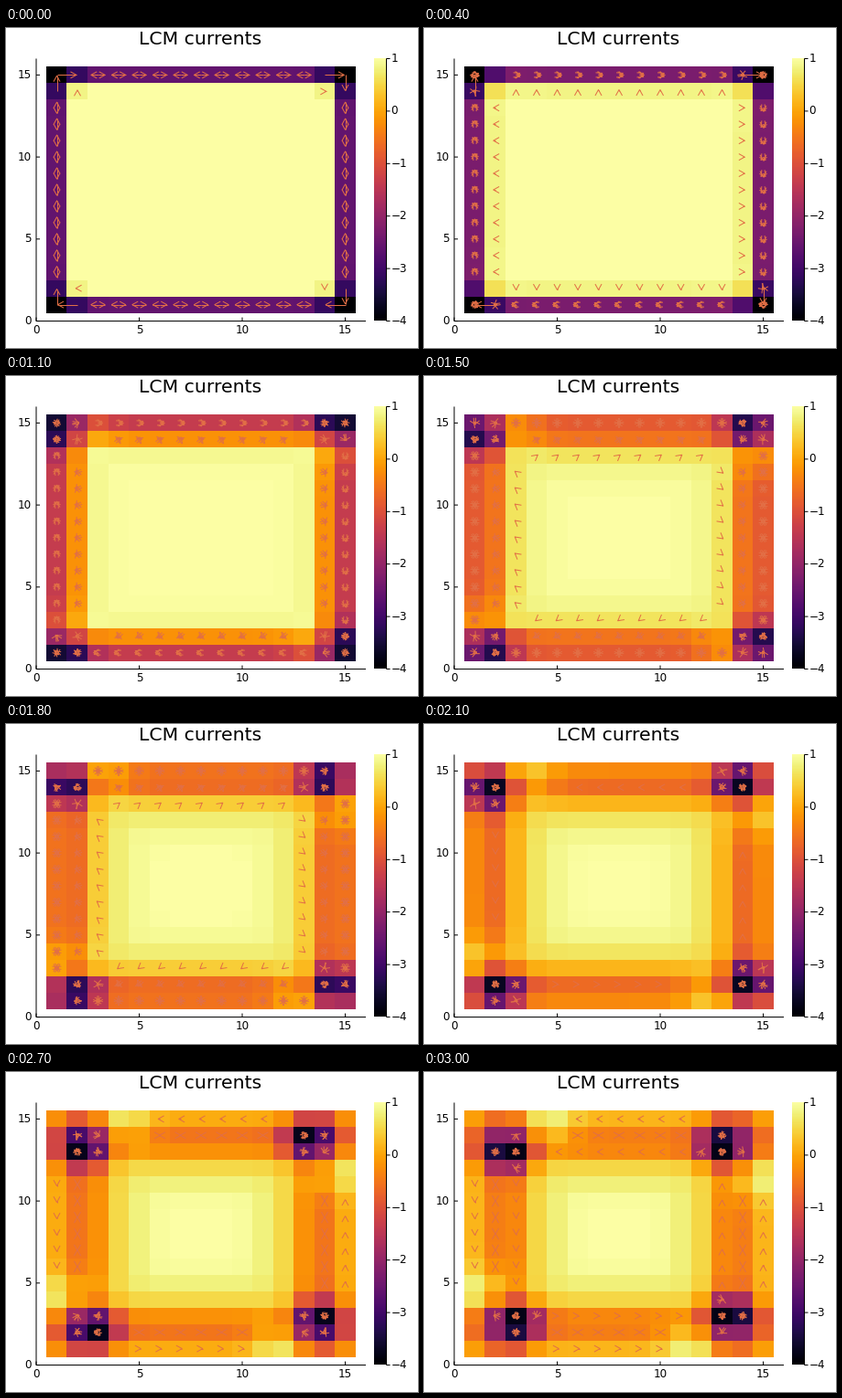
Animation, 450 px wide and 350 px high, one loop 3.1 s. Source, as a matplotlib script:

```python
import matplotlib.pyplot as plt
import numpy as np
from matplotlib.animation import FuncAnimation
from matplotlib.collections import LineCollection

W, H, DPI = 450, 350, 100
PT = 72 / DPI                      # points per pixel
N, FRAMES = 15, 31
X0, Y0, DX, DY = 33, 320.55, 22.5, 17.945
ARROW = "#e26f46"
plt.rcParams["font.family"] = "DejaVu Sans"

COLS, ROWS = np.meshgrid(np.arange(1, N + 1), np.arange(N, 0, -1))
EDGE = np.minimum(np.arange(N), np.arange(N)[::-1])

# Depth, peak time and log width of the dip in each inner ring
WAVES = [(1.65, 20, 1.05), (1.4, 36, .75), (.5, 30, .6), (.22, 32, .6),
         (.06, 34, .6)]

# Arrows of the top side: first and last time, row, first and last column,
# length, angles (0 is clockwise along the border, 90 is outwards)
BOTH = (0, 180)
BANDS = [
    (0, 2, 15, 1, 1, .95, [0]),
    (0, 6, 15, 14, 14, .95, [0]),
    (0, 2, 14, 14, 14, .08, [0]),
    (0, 2, 15, 3, 13, .34, BOTH),
    (3, 11, 15, 3, 13, .22, [0, 30, -30]),
    (12, 18, 15, 3, 13, .12, range(0, 360, 60)),
    (23, 30, 15, 6, 11, .08, [180]),
    (3, 6, 14, 3, 13, .1, [90]),
    (7, 18, 14, 4, 12, .14, [10, 75, 150]),
    (19, 22, 14, 6, 11, .05, [180]),
    (23, 30, 14, 6, 11, .02, BOTH),
    (12, 18, 13, 4, 12, .08, [45]),
    (28, 30, 13, 5, 11, .05, [180]),
]


def blob(x, y, size):
    return np.exp(-((COLS - x) ** 2 + (ROWS - y) ** 2) / (2 * size ** 2))


def vortex(t):
    """Spot that drifts from the top left corner into the bulk."""
    s = t / 30
    return blob(1 + 1.6 * s ** 2, 15 - 2 * s ** 1.3, .65 + .15 * s)


def field_at(t):
    dips = np.zeros(8)
    dips[0] = .6 + 3 * np.exp(-(t / 16.5) ** 1.6)
    for d, (depth, peak, width) in enumerate(WAVES, 1):
        dips[d] = depth * np.exp(-(np.log(max(t, .01) / peak) / width) ** 2)
    side = dips[EDGE] ** 3
    field = 1 - np.add.outer(side, side) ** (1 / 3)

    wake = .8 * min(1, t / 15) * blob(1 + .12 * t, 15 - .02 * t, .9)
    corner = wake - (1.8 + .06 * t) * vortex(t)
    return field + sum(np.rot90(corner, k) for k in range(4))


def arrow_lines(x, y, dx, dy, head=7.3, spread=np.radians(29)):
    start = np.array([X0 + DX * x, Y0 - DY * y])
    tip = start + [DX * dx, -DY * dy]
    back = np.arctan2(start[1] - tip[1], start[0] - tip[0])
    left, right = [tip + head * np.array([np.cos(a), np.sin(a)])
                   for a in (back - spread, back + spread)]
    return [[start, tip], [left, tip, right]]


def on_all_sides(x, y, length, angle):
    x, y, a = x - 8, y - 8, np.radians(angle)
    dx, dy = length * np.cos(a), length * np.sin(a)
    lines = []
    for _ in range(4):
        lines += arrow_lines(x + 8, y + 8, dx, dy)
        x, y, dx, dy = y, -x, dy, -dx
    return lines


def arrows_at(t):
    lines = []
    for start, end, row, first, last, length, angles in BANDS:
        if start <= t <= end:
            for col in range(first, last + 1):
                for angle in angles:
                    lines += on_all_sides(col, row, length, angle)

    # Irregular stars where the vortex is strong
    rng = np.random.default_rng(t)
    strength = vortex(t)
    for i, j in np.argwhere(strength > .35):
        count = 2 + int(4 * strength[i, j]) if t > 2 else 0
        for angle in rng.uniform(0, 360, count):
            lines += on_all_sides(COLS[i, j], ROWS[i, j],
                                  .22 * strength[i, j], angle)
    return lines


fig = plt.figure(figsize=(W / DPI, H / DPI), dpi=DPI, facecolor="white")
ax = fig.add_axes([0, 0, 1, 1])
ax.axis("off")


def rule(x, y):
    ax.plot(x, y, color="black", lw=PT, solid_capstyle="butt", zorder=4,
            snap=False)


def label(x, y, text, size=12, ha="center", va="center"):
    ax.text(x, y, text, fontsize=size * PT, ha=ha, va=va, color="black")


heat = ax.imshow(field_at(0), cmap="inferno", vmin=-4, vmax=1, aspect="auto",
                 interpolation="nearest",
                 extent=(X0 + DX / 2, X0 + DX * 15.5,
                         Y0 - DY / 2, Y0 - DY * 15.5))
ax.imshow(np.linspace(1, 0, 256)[:, None], cmap="inferno", aspect="auto",
          interpolation="nearest", extent=(402, 415.5, 320.5, 33.5))
arrows = LineCollection([], colors=ARROW, linewidths=PT, zorder=3)
ax.add_collection(arrows, autolim=False)

rule([X0, X0], [33.5, Y0])
rule([X0, 393], [Y0, Y0])
rule([415.5, 415.5], [33.5, 320.5])
for v in (0, 5, 10, 15):
    px, py = X0 + DX * v, Y0 - DY * v
    rule([px, px], [Y0 - 4, Y0])
    rule([X0, X0 + 4], [py, py])
    label(px, 331, str(v))
    label(28, py, str(v), ha="right")
for v in range(-4, 2):
    py = 33.5 + 57.4 * (1 - v)
    rule([415.5, 419.5], [py, py])
    label(420.5, py, str(v).replace("-", "\u2212"), ha="left")
label(212.5, 18.3, "LCM currents", 20.4, va="baseline")
ax.set_xlim(0, W)
ax.set_ylim(H, 0)


def update(frame):
    heat.set_data(np.clip(field_at(frame), -4, 1))
    arrows.set_segments(arrows_at(frame))
    return heat, arrows


anim = FuncAnimation(fig, update, frames=FRAMES, interval=100,
                     repeat=True, repeat_delay=0, blit=False)
plt.show()
```
